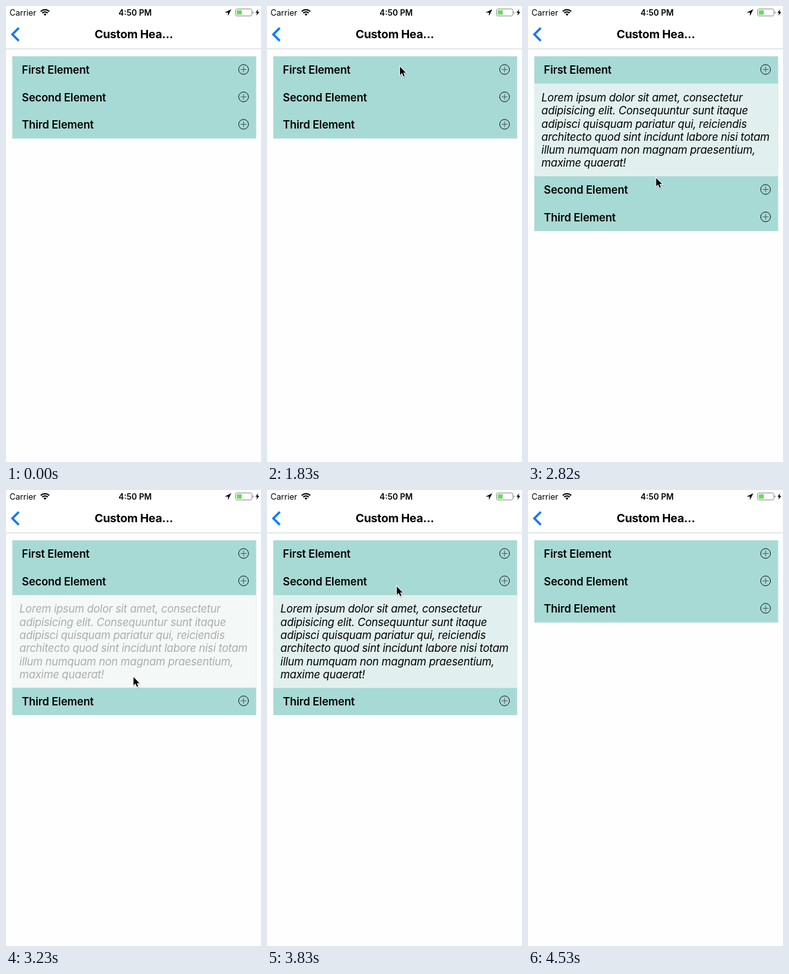
Animation of 395 by 707 pixels, one loop 4960 ms. Source, as an HTML page:

```html
<!DOCTYPE html>
<html lang="en">
<head>
<meta charset="utf-8">
<title>Accordion</title>
<style>
  html, body { margin: 0; width: 100%; height: 100%; overflow: hidden; background: #fefefe; }
  svg { display: block; width: 100%; height: 100%; font-family: Inter, Roboto, sans-serif; }
  .row { font-size: 16.85px; font-weight: 600; letter-spacing: -0.12px; }
  .body { font-size: 16.85px; font-style: italic; letter-spacing: -0.25px; }
  .title { font-size: 17.9px; font-weight: 700; letter-spacing: -0.25px; }
  .line { fill: none; stroke: #000; }
</style>
</head>
<body>
<svg viewBox="0 0 395 707">
  <rect width="395" height="66" fill="#fff"/>
  <rect y="66" width="395" height="1" fill="#d0d3d8"/>

  <text x="5.5" y="14.6" font-size="12.64">Carrier</text>
  <g class="line" stroke-width="2.1">
    <path d="M53.8 8.4a9.4 9.4 0 0 1 13.2 0"/>
    <path d="M56.2 11a6 6 0 0 1 8.4 0"/>
  </g>
  <path d="M58.2 12.8a3.2 3.2 0 0 1 4.4 0L60.4 15.2z"/>
  <text x="200" y="14.6" font-size="12.64" font-weight="600" text-anchor="middle">4:50 PM</text>
  <path d="M349 5L343.8 15.4V10.3H338.6z"/>
  <rect x="355.5" y="4.6" width="25.4" height="10.8" rx="2.2" fill="#fff" stroke="#8c8c8c"/>
  <rect x="357.4" y="6.4" width="7.8" height="7.2" rx="0.6" fill="#6bd763"/>
  <path d="M382 8.2a2 2 0 0 1 0 3.8z" fill="#8c8c8c"/>
  <path d="M390.6 5L386.4 10.6H389L387.8 15L392.4 9.2H389.6z"/>

  <path d="M19.8 34L9.8 44L19.8 54" fill="none" stroke="#0a7aff" stroke-width="3.4"/>
  <text class="title" x="198" y="49.6" text-anchor="middle">Custom Hea...</text>

  <rect id="back" x="9.7" y="78" width="377.8" fill="#a8dad5"/>
  <g id="rows"></g>
  <g id="panel">
    <rect x="9.7" width="377.8" height="143.5" fill="#fefefe"/>
    <g id="content">
      <rect x="9.7" width="377.8" height="143.5" fill="#e1f0ee"/>
      <g id="copy" class="body"></g>
    </g>
  </g>
  <g id="cursor">
    <path d="M0 0V12.9L3 10.1L5.3 15.1L7.3 14.2L5.1 9.4H9.2z" transform="translate(.6 1.6)" stroke="#000" stroke-width="1.6" opacity=".16"/>
    <path d="M0 0V12.9L3 10.1L5.3 15.1L7.3 14.2L5.1 9.4H9.2z" stroke="#fff" stroke-width="1.8" paint-order="stroke"/>
  </g>
</svg>
<script>
  const LOOP = 4960, TOP = 78, ROW = 42.5, PANEL = 143.5, FADE = 300;
  const el = id => document.getElementById(id);
  const move = (node, x, y) => node.setAttribute('transform', `translate(${x} ${y})`);
  const clamp = p => Math.min(1, Math.max(0, p));
  const smooth = p => p * p * (3 - 2 * p);
  const slowDown = p => 1 - (1 - p) ** 2;

  el('rows').innerHTML = ['First', 'Second', 'Third'].map(name => `<g>
    <text class="row" x="24.6" y="27.2">${name} Element</text>
    <circle class="line" cx="368" cy="20.4" r="7.6" stroke-width=".9"/>
    <path class="line" stroke-width=".55" d="M363.3 20.4h9.4M368 15.7v9.4"/></g>`).join('');
  const rows = [...el('rows').children];

  el('copy').innerHTML = [
    'Lorem ipsum dolor sit amet, consectetur',
    'adipisicing elit. Consequuntur sunt itaque',
    'adipisci quisquam pariatur qui, reiciendis',
    'architecto quod sint incidunt labore nisi totam',
    'illum numquam non magnam praesentium,',
    'maxime quaerat!'
  ].map((s, i) => `<text x="20.8" y="${27.4 + i * 20.3}">${s}</text>`).join('');

  // Each opening shows its panel at once, partway into the fade
  const openings = [
    { row: 0, from: 2220, to: 3170, fadeFrom: 2097 },
    { row: 1, from: 3170, to: 4010, fadeFrom: 3118 }
  ];

  const enter = 1410, leave = 4530;
  const home = { x: 243, y: 680.5 };
  const moves = [
    { from: 1480, to: 1830, x: 206, y: 94, ease: smooth },
    { from: 2500, to: 2990, x: 197.5, y: 290, ease: slowDown },
    { from: 3430, to: 3830, x: 201, y: 149.5, ease: slowDown },
    { from: 4230, to: leave, x: 332, y: 707, ease: smooth }
  ];

  function pointer(t) {
    return moves.reduce((pos, m) => {
      const p = m.ease(clamp((t - m.from) / (m.to - m.from)));
      return { x: pos.x + (m.x - pos.x) * p, y: pos.y + (m.y - pos.y) * p };
    }, home);
  }

  function draw(t) {
    const opened = openings.find(o => t >= o.from && t < o.to);
    const last = opened ? opened.row : rows.length;
    rows.forEach((row, i) => move(row, 0, TOP + i * ROW + (i > last ? PANEL : 0)));
    el('back').setAttribute('height', rows.length * ROW + (opened ? PANEL : 0));
    el('panel').setAttribute('display', opened ? 'inline' : 'none');
    if (opened) {
      move(el('panel'), 0, TOP + (opened.row + 1) * ROW);
      el('content').setAttribute('opacity', smooth(clamp((t - opened.fadeFrom) / FADE)));
    }

    const { x, y } = pointer(t);
    el('cursor').setAttribute('display', t >= enter && t < leave ? 'inline' : 'none');
    move(el('cursor'), x, y);
  }

  const start = performance.now();
  function tick() {
    draw((performance.now() - start) % LOOP);
    requestAnimationFrame(tick);
  }
  tick();
</script>
</body>
</html>
```
